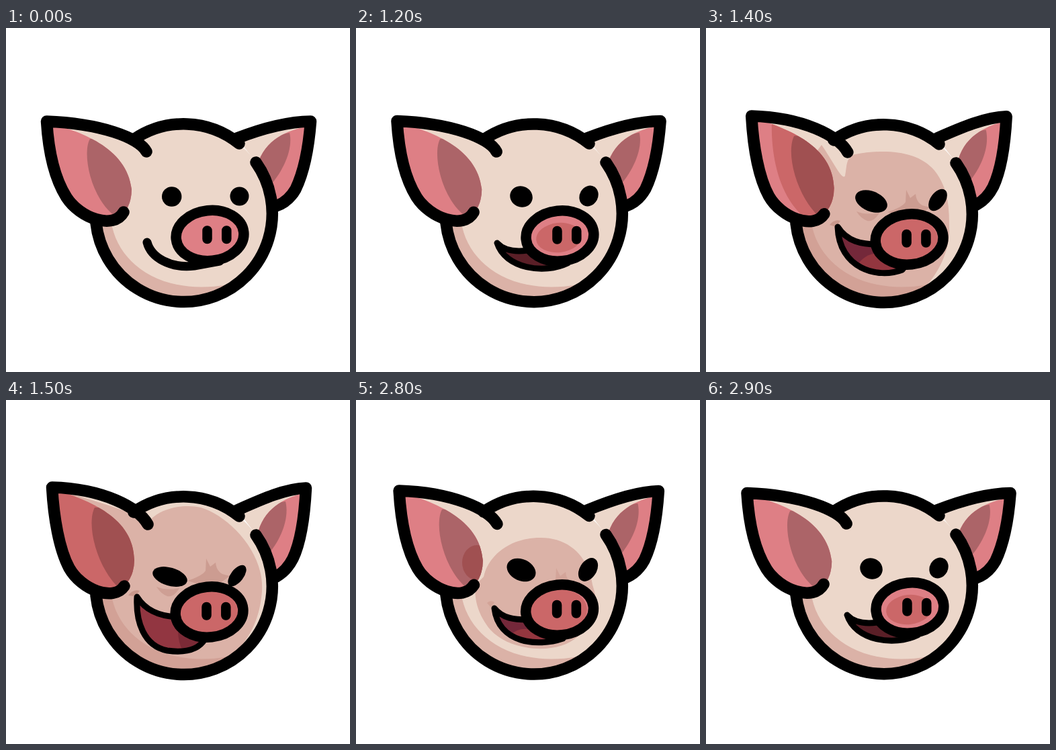
An HTML page for the animation above (3000 ms loop, 512 by 512 pixels).

```html
<!DOCTYPE html>
<html lang="en">
<head>
<meta charset="utf-8">
<title>Pig</title>
<style>
  html, body { margin: 0; width: 100%; height: 100%; overflow: hidden; background: #fff; }
  svg { display: block; width: 100vw; height: 100vh; }
  .line { fill: none; stroke: #000; stroke-width: 17.5; stroke-linecap: round; stroke-linejoin: round; }
</style>
</head>
<body>
<svg id="stage" viewBox="0 0 512 512"></svg>
<script>
const SKIN = '#ecd7ca', SHADE = '#dbb2a7', DEEP = '#d2a196', CREASE = '#c9988c';
const PINK = '#de7f85', RED = '#cb6768', DUSK = '#ac6468', WINE = '#a05051';

// Each pair is the calm shape and the wicked shape.
const EAR_L = [
  'M209 184 C198 163 140 142 60.5 139 C63 180 71 222 90 252 C110 283 160 301 175 274',
  'M211 185 C197 160 145 132 68.5 130 C71 175 79 222 94 250 C112 282 160 301 176 277'];
const LEAF_L = [
  'M62 141 C108 153 180 177 187 240 Q187 262 175 276 C160 301 110 283 90 252 C71 222 63 180 60.5 139Z',
  'M70 132 C125 150 190 175 191 238 Q191 262 176 277 C160 301 112 282 94 250 C79 222 71 175 68.5 130Z'];
const DARK_L = [
  'M125 165 C113 185 125 255 165 282 L200 270 L200 160Z',
  'M132 160 C119 185 135 250 170 282 L200 270 L200 160Z'];
const EAR_R = [
  'M344 164 C380 150 420 139.5 453.5 139 C450 185 443 215 431 240 Q420 259 402 265',
  'M344 164 C380 148 415 132 446.5 131 C444 180 438 213 427 236 Q418 254 402 263'];
const LEAF_R = [
  'M450 146 C420 152 385 165 374 205 L400 265 Q420 259 431 240 C443 215 450 185 453.5 139Z',
  'M444 138 C414 146 382 162 374 202 L400 263 Q418 254 427 236 C438 213 444 180 446.5 131Z'];
const DARK_R = [
  'M422 156 C428 180 412 215 390 238 L370 205 C380 175 402 158 422 156Z',
  'M416 151 C422 175 410 208 388 232 L370 202 C376 170 396 153 416 151Z'];

const CRESCENT = 'M120 290 L157 290 C165 345 225 400 330 382 L330 430 L120 430Z';
const FROWN = 'M270 269 Q292 262 297 254 L298 236 L304 248 L312 242 Q313 254 322 259 L333 262 L318 273 L290 275Z';
const BAG = 'M224 278 Q238 284 258 280 Q250 294 240 292 Q230 288 224 278Z';

// eye: cx, cy, rx, ry, rotation
const POSES = [
  { k: 0, drop: 0, eyes: [[246.7, 251, 14.7, 14.7, 0], [347.5, 250.5, 14, 14, 0]] },
  { k: .06, drop: .5, eyes: [[246, 251, 17, 15.5, 25], [346.5, 250, 13.5, 16, 30]],
    mouth: 'M210 320 C222 333 240 333 255 331 L290 345 L315 350 C280 367 222 358 210 320Z',
    gum: '#5a1f27', red: [302, 312, 34, 22] },
  { k: .45, drop: 3.5, eyes: [[246, 253, 22.5, 16, 25], [345.5, 252.5, 12.5, 19, 32]],
    mouth: 'M206 310 C218 325 236 327 255 327 L300 345 L308 355 C270 368 212 362 206 310Z',
    gum: '#74283a', tongue: ['#93363f', 'M230 350 Q245 334 275 346 L300 370 L245 370Z'],
    red: [297, 315, 47, 34],
    shade: 'M190 263 C196 235 225 205 275 205 C315 205 345 230 352 275 C360 300 365 330 330 352 C300 380 230 375 200 342 C178 315 176 290 178 275Z',
    crease: 'M195 302 Q200 297 206 301 L201 309Z' },
  { k: .9, drop: 5.5, eyes: [[246, 258, 25, 15, 22], [345, 256, 11, 18.3, 35]],
    mouth: 'M196 296 C210 318 232 322 255 322 L300 350 L292 360 C255 374 198 358 196 296Z',
    gum: '#74283a', tongue: ['#93363f', 'M224 355 Q240 328 275 338 L300 375 L240 375Z'],
    red: [298, 317, 47, 36],
    shade: 'M172 174 C190 200 203 228 207 220 C210 205 208 192 222 188 C265 180 315 182 340 212 C362 240 362 270 362 300 C362 335 345 365 326 386 L320 430 L100 430 L100 270Z',
    crease: 'M184 293 Q191 284 200 287 L193 296Z' },
  { k: 1, drop: 6.5, eyes: [[244, 263, 26.5, 13.5, 16], [344, 261.5, 9.5, 18.5, 38]],
    mouth: 'M195 293 C208 314 230 322 255 323 L300 350 L296 356 C285 374 262 376 240 373 C205 366 193 330 195 293Z',
    gum: '#923641', tongue: ['#7b2a36', 'M256 344 Q256 360 264 376 L300 372 L300 340Z'],
    red: [298, 318, 47, 37],
    shade: 'M60 128 L150 156 L215 178 C235 158 270 155 290 160 C330 172 385 225 381 285 C378 320 368 350 335 383 L320 430 L100 430 L50 270Z',
    crease: 'M182 291 Q189 281 199 284 L192 292Z' }
];
// start time in ms, pose
const STEPS = [[0, 0], [1200, 1], [1300, 2], [1400, 3], [1500, 4], [2700, 3], [2800, 2], [2900, 1]];
const LOOP = 3000;

function mix([a, b], k) {
  const ends = b.match(/-?[\d.]+/g);
  return a.replace(/-?[\d.]+/g, v => (+v + (ends.shift() - v) * k).toFixed(2));
}
const path = (d, fill, more = '') => `<path d="${d}" fill="${fill}" ${more}/>`;
const line = d => `<path d="${d}" class="line"/>`;
const oval = ([cx, cy, rx, ry, turn = 0], more = '') =>
  `<ellipse cx="${cx}" cy="${cy}" rx="${rx}" ry="${ry}" transform="rotate(${turn} ${cx} ${cy})" ${more}/>`;
const clip = (id, shape) => `<clipPath id="${id}">${shape}</clipPath>`;
const clipped = (id, shape) => `<g clip-path="url(#${id})">${shape}</g>`;

function leftLeaf(i, k) {
  const base = i === 4 ? RED : PINK;
  const dark = path(mix(DARK_L, k), i > 2 ? WINE : DUSK);
  const band = i === 3 ? path('M98 135 C96 190 108 252 150 285 L210 270 L200 150Z', RED) : '';
  const patch = i === 2 ? oval([180, 242, 22, 26], `fill="${WINE}"`) : '';
  return clipped('leaf' + i, `<rect width="512" height="512" fill="${base}"/>` + band + dark + patch);
}

function snout(i, p) {
  const x = 303.5 - p.k, y = 309 + p.drop;
  const shape = [x, y, 50.5, 37.5, -6];
  let out = oval(shape, `fill="${PINK}"`);
  if (p.red) out += clip('snout' + i, oval(shape)) + clipped('snout' + i, oval([...p.red, -6], `fill="${RED}"`));
  out += oval(shape, 'class="line" style="stroke-width:15.5"');
  const hole = nx => `M${nx - p.k} ${y - 7.5}v12.5`;
  return out + `<path d="${hole(299.5)}${hole(328.3)}" class="line" style="stroke-width:14.5"/>`;
}

function mouth(i, p) {
  if (!p.mouth) return '<path d="M210 319 C216 342 245 358 280 354 L318 347" class="line" style="stroke-width:13"/>';
  const tongue = p.tongue
    ? clip('mouth' + i, path(p.mouth, '#000')) + clipped('mouth' + i, path(p.tongue[1], p.tongue[0])) : '';
  return path(p.mouth, p.gum) + tongue +
    path(p.mouth, 'none', 'stroke="#000" stroke-width="9" stroke-linejoin="round"');
}

function pig(p, i) {
  const k = p.k, earL = mix(EAR_L, k), earR = mix(EAR_R, k), cy = 275.5 + k;
  const head = oval([264.8, cy, 131.5, 131.5], `fill="${SKIN}"`);
  const skin = path(earL + 'Z', SKIN);
  let face = p.shade ? path(p.shade, SHADE) : '';
  face += path(CRESCENT, i > 2 ? DEEP : SHADE);
  let marks = '';
  if (i > 1) {
    const tone = i === 2 ? '#d3a498' : CREASE;
    marks = path(FROWN, tone, `transform="translate(0 ${i === 2 ? 14 : i === 3 ? 5 : 0})" opacity="${i === 2 ? .9 : .8}"`) +
      (i > 2 ? path(BAG, tone, `transform="translate(0 ${i === 3 ? -5 : 0})" opacity=".7"`) : '') +
      path(p.crease, tone);
  }
  return `<g visibility="hidden">` +
    clip('face' + i, head + skin) + clip('leaf' + i, path(mix(LEAF_L, k), '#000')) + clip('earR' + i, path(mix(LEAF_R, k), '#000')) +
    path(earR + 'L372 200Z', SKIN) +
    path(mix(LEAF_R, k), PINK) + clipped('earR' + i, path(mix(DARK_R, k), DUSK)) +
    head + skin + clipped('face' + i, face) + leftLeaf(i, k) + marks +
    line(`M190 ${166 + k}A131.5 131.5 0 0 1 347 ${172 + k}M372 ${200 + k}A131.5 131.5 0 1 1 134 ${290 + k}`) +
    line(earL) + line(earR) +
    p.eyes.map(e => oval(e)).join('') + mouth(i, p) + snout(i, p) + '</g>';
}

const stage = document.getElementById('stage');
stage.innerHTML = POSES.map(pig).join('');
const groups = [...stage.children];

function draw() {
  const t = performance.now() % LOOP;
  const now = STEPS.filter(s => s[0] <= t).pop()[1];
  groups.forEach((g, i) => g.setAttribute('visibility', i === now ? 'visible' : 'hidden'));
  requestAnimationFrame(draw);
}
draw();
</script>
</body>
</html>
```
